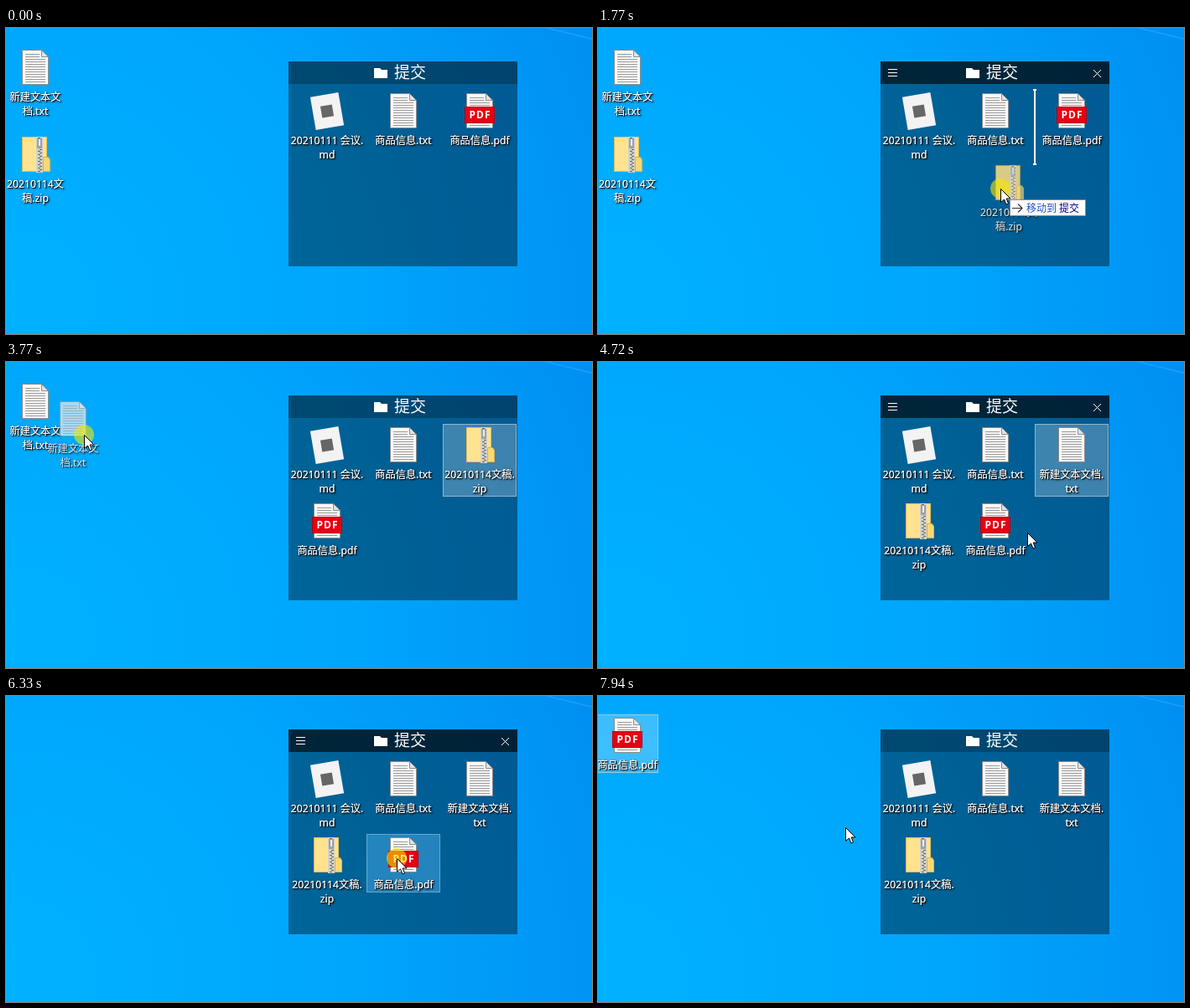
Write an HTML page with a canvas that moves like this. It is 699 px wide and 366 px high and loops after 8000 ms.

```html
<!DOCTYPE html>
<html lang="zh-CN">
<head>
<meta charset="utf-8">
<title>桌面整理</title>
<style>
  html, body { margin: 0; width: 100%; height: 100%; overflow: hidden; background: #00a4fa; }
  canvas { display: block; }
</style>
</head>
<body>
<canvas id="stage" width="699" height="366"></canvas>
<script>
const ctx = document.getElementById('stage').getContext('2d');
const FONT = '"Noto Sans", "Noto Sans CJK SC", "Noto Sans CJK", sans-serif';
const LOOP = 8000, TICK = 77.1;
const PANEL = { x: 337, y: 40, w: 273, h: 245, bar: 27 };

const easeInOut = u => u < .5 ? 4 * u ** 3 : 1 - 4 * (1 - u) ** 3;
const easeOut = u => 1 - (1 - u) ** 2;

// Pointer strokes in ticks; each one begins where the last one ended.
const START = [289, 328];
const MOVES = [
  { from: 5, to: 13, end: [25, 158] },
  { from: 14, to: 23, end: [480, 192] },
  { from: 33, to: 44, end: [48, 66], bend: [196, 86], ease: easeOut },
  { from: 47, to: 54, end: [512, 204], bend: [291, 183] },
  { from: 66, to: 71, end: [490, 154] },
  { from: 72, to: 76, end: [466, 194] },
  { from: 82, to: 91, end: [108, 157], bend: [300, 396] },
  { from: 100, to: 103, end: [295, 157] }
];

const newText = { icon: drawText, desk: ['新建文本文', '档.txt'], panel: ['新建文本文档.', 'txt'] };
const zip = { icon: drawZip, desk: ['20210114文', '稿.zip'], panel: ['20210114文稿.', 'zip'] };
const notes = { icon: drawNotes, panel: ['20210111 会议.', 'md'] };
const goodsText = { icon: drawText, panel: ['商品信息.txt'] };
const goodsPdf = { icon: drawPdf, desk: ['商品信息.pdf'], panel: ['商品信息.pdf'] };

const DRAGS = [
  { file: zip, from: 15, drop: 26, intoPanel: true },
  { file: newText, from: 48, drop: 58, intoPanel: true },
  { file: goodsPdf, from: 82, drop: 93, intoPanel: false }
];
const [zipDrag, textDrag, pdfDrag] = DRAGS;

function pointerAt(k) {
  if (k < MOVES[0].from) return null;
  let pos = START;
  for (const { from, to, end, bend, ease = easeInOut } of MOVES) {
    if (k <= from) break;
    const e = ease(Math.min(1, (k - from) / (to - from)));
    pos = pos.map((a, i) => {
      const mid = bend ? bend[i] : (a + end[i]) / 2;
      return Math.round(a * (1 - e) ** 2 + 2 * mid * e * (1 - e) + end[i] * e * e);
    });
  }
  return pos;
}

function inRect(p, r) {
  return !!p && p[0] >= r.x && p[0] < r.x + r.w && p[1] >= r.y && p[1] < r.y + r.h;
}

function rect(x, y, w, h, color) {
  ctx.fillStyle = color;
  ctx.fillRect(x, y, w, h);
}

function path(d, fill, stroke, width = 1) {
  const p = new Path2D(d);
  if (fill) { ctx.fillStyle = fill; ctx.fill(p); }
  if (stroke) { ctx.strokeStyle = stroke; ctx.lineWidth = width; ctx.stroke(p); }
}

function text(str, x, y, size, color, align = 'left', weight = '') {
  ctx.font = `${weight} ${size}px ${FONT}`;
  ctx.textAlign = align;
  ctx.fillStyle = color;
  ctx.fillText(str, x, y);
}

function at(x, y, draw) {
  ctx.save();
  ctx.translate(x, y);
  draw();
  ctx.restore();
}

// Icons are drawn around x = 0 with their top at y = 0.
function drawText() {
  path('M-15.5 .5H7.5l8 8v33h-31z', '#f8f8f8', '#8d8d8d');
  for (let y = 5; y < 40; y += 3) rect(-12, y, y < 9 ? 17 : 24, 1, '#999');
  path('M7.5 .5v8h8z', '#e2e2e2', '#8d8d8d');
}

function drawPdf() {
  drawText();
  rect(-18, 16, 36, 20, '#b5000c');
  rect(-17, 17, 34, 18, '#e60012');
  ctx.letterSpacing = '1px';
  text('PDF', .5, 30, 12, '#fff', 'center', 'bold');
  ctx.letterSpacing = '0px';
}

function drawZip() {
  rect(-16, 0, 30, 42, '#e3bd5c');
  rect(-15, 1, 28, 40, '#ffe391');
  path('M9.5 41.5v-17h6l2 3v14z', '#fbd871', '#dcb34c');
  rect(1, 0, 8, 43, '#d3d2c8');
  for (let y = 1; y < 43; y += 2) rect(y % 4 < 2 ? 3 : 5, y, 3, 1, '#5f6468');
  rect(2, 2, 6, 12, '#9aa3a9');
  rect(4, 3, 2, 8, '#e9eef0');
}

function drawNotes() {
  at(0, 21.5, () => {
    ctx.rotate(-.17);
    rect(-17, -20, 34, 40, '#f3f3f3');
    rect(-7, -7, 14, 14, '#666');
  });
}

function drawFile(file, lines, x, y) {
  at(x, y, () => {
    file.icon();
    ctx.shadowColor = '#000';
    ctx.shadowOffsetX = ctx.shadowOffsetY = 1;
    for (const blur of [3, 1]) {
      ctx.shadowBlur = blur;
      lines.forEach((str, i) => text(str, 0, 61 + i * 17, 12.2, '#fff', 'center'));
    }
  });
}

function drawCell({ x, y, w, h }, fill, border, dash = []) {
  rect(x, y, w, h, fill);
  ctx.strokeStyle = border;
  ctx.lineWidth = 1;
  ctx.setLineDash(dash);
  ctx.strokeRect(x + .5, y + .5, w - 1, h - 1);
  ctx.setLineDash([]);
}

function drawWallpaper() {
  const g = ctx.createRadialGradient(20, 330, 20, 20, 330, 740);
  g.addColorStop(0, '#00b1ff');
  g.addColorStop(.5, '#00a6fc');
  g.addColorStop(1, '#0090f3');
  rect(0, 0, 699, 366, g);
  path('M645 0l54 13', null, 'rgba(90,195,255,.3)', 1.5);
}

function drawPanel(hover) {
  const { x, y, w, h, bar } = PANEL;
  rect(x, y, w, h, 'rgba(0,0,0,.4)');
  rect(x, y, w, bar, `rgba(0,0,0,${.25 + .37 * hover})`);
  path('M439 48h7l2 2h7v10h-16z', '#fff');
  text('提交', 463, 60, 19, '#fff');
  ctx.globalAlpha = hover;
  path('M346 49.5h11m-11 4h11m-11 4h11M591 50l9 9m0-9l-9 9', null, '#fff');
  ctx.globalAlpha = 1;
}

function drawPointer(x, y) {
  at(x + .5, y + .5, () => path('M0 0v16l4-3.5 2.5 6 2.5-1-2.3-6h4.8z', '#fff', '#000'));
}

function drawTip(x, y, dest) {
  at(x + 11, y + 13, () => {
    rect(0, 0, 91, 20, '#8a8a8a');
    rect(1, 1, 89, 18, '#fff');
    path('M3 10.5h12m-5-5l5 5-5 5', null, '#333', 1.2);
    text('移动到', 20, 15, 12, '#1e50c8');
    text(dest, 59, 15, 12, '#000080');
  });
}

function drawInsertMark() {
  path('M521 73v91M519 74h4m-4 89h4', null, '#fff', 2);
}

// Files on the desktop and in the panel, with their cells.
function layout(k) {
  const desk = [], panel = [notes, goodsText];
  if (k < textDrag.drop) desk.push(newText);
  if (k < zipDrag.drop) desk.push(zip);
  if (k > pdfDrag.drop + 1) desk.push(goodsPdf);
  if (k > textDrag.drop) panel.push(newText);
  if (k > zipDrag.drop) panel.push(zip);
  if (k < pdfDrag.drop) panel.push(goodsPdf);

  const place = (file, lines, x, y, half, inPanel) => ({
    file, lines, x, y, inPanel,
    cell: { x: x - half, y: y - 4, w: half * 2, h: 53 + 17 * lines.length }
  });
  return [
    ...desk.map((f, i) => place(f, f.desk, 35, 26 + 104 * i, 37, false)),
    ...panel.map((f, i) => place(f, f.panel, 383 + 91 * (i % 3), 78 + 91 * Math.floor(i / 3), 44, true))
  ];
}

// A dropped file stays selected until the next drop; the PDF is selected on press.
function isSelected({ file, inPanel }, k) {
  if (file === goodsPdf) return k >= pdfDrag.from;
  if (!inPanel || k >= pdfDrag.from) return false;
  return file === (k < textDrag.drop ? zip : newText);
}

function drawItem(item, k, hovered) {
  const { file, lines, x, y, cell, inPanel } = item;
  if (isSelected(item, k)) {
    if (inPanel && file === goodsPdf) drawCell(cell, 'rgba(80,175,235,.45)', 'rgba(190,225,245,.8)', [1, 1]);
    else drawCell(cell, 'rgba(255,255,255,.24)', 'rgba(205,215,222,.6)');
  } else if (hovered) {
    drawCell(cell, 'rgba(130,205,255,.3)', 'rgba(170,220,255,.5)');
  }
  drawFile(file, lines, x, y);
}

function drawDrag({ file, from, intoPanel }, [x, y], overPanel) {
  const home = layout(from).find(item => item.file === file);
  const [gx, gy] = pointerAt(from - 1);
  if (intoPanel && overPanel) drawInsertMark();
  if (x !== gx || y !== gy) {
    ctx.globalAlpha = .65;
    drawFile(file, file.desk, home.x + x - gx, home.y + y - gy);
    ctx.globalAlpha = 1;
  }
  ctx.beginPath();
  ctx.arc(x, y, 12, 0, 7);
  ctx.fillStyle = 'rgba(245,230,0,.6)';
  ctx.fill();
}

function render(t) {
  const k = Math.floor((t + 15) / TICK);
  const pos = pointerAt(k);
  const drag = DRAGS.find(d => k >= d.from && k < d.drop);
  const overPanel = inRect(pos, PANEL);
  const hover = [0, 1, 2, 3].filter(i => inRect(pointerAt(k - i), PANEL)).length / 4;
  // Hover returns only once the pointer moves after a drop.
  const canHover = !drag && !DRAGS.some(d => k >= d.drop && k < d.drop + 9);

  drawWallpaper();
  drawPanel(hover);
  layout(k).forEach(item => drawItem(item, k, canHover && inRect(pos, item.cell)));
  if (!pos) return;
  if (drag) drawDrag(drag, pos, overPanel);
  drawPointer(...pos);
  if (drag && overPanel === drag.intoPanel) drawTip(...pos, drag.intoPanel ? '提交' : '桌面');
}

const start = performance.now();
function frame() {
  render((performance.now() - start) % LOOP);
  requestAnimationFrame(frame);
}
frame();
</script>
</body>
</html>
```
